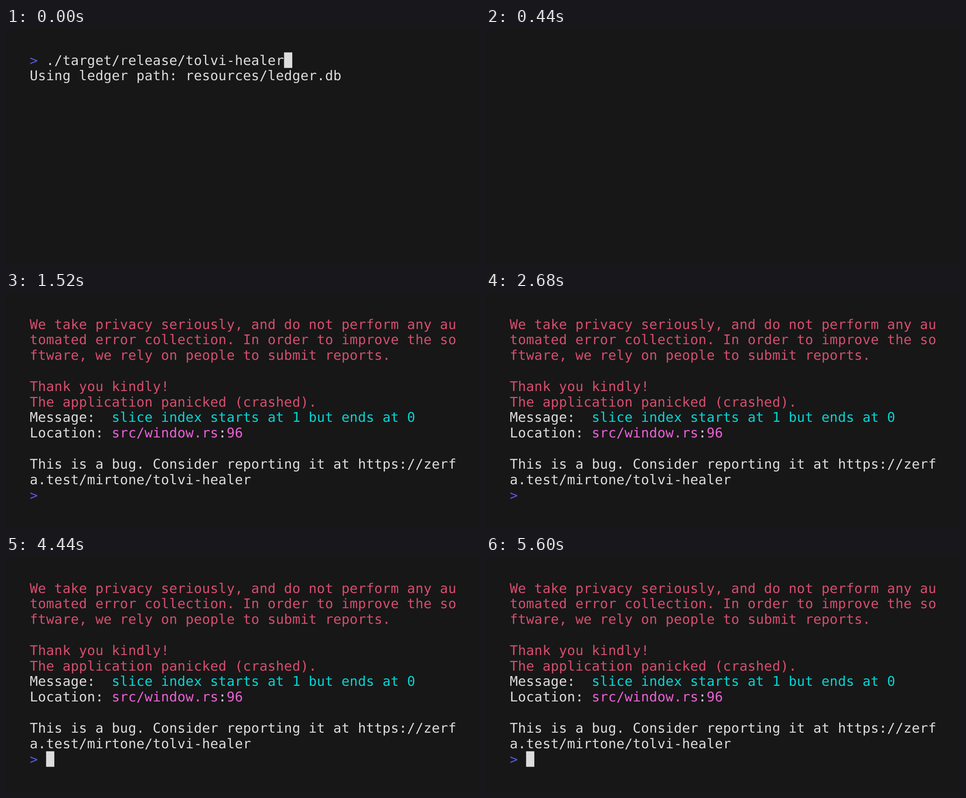
These frames come from a looping animation (1058 by 529 pixels, 5840 ms). An HTML page:

```html
<!DOCTYPE html>
<html lang="en">
<head>
<meta charset="utf-8">
<title>Terminal session</title>
<style>
  html, body { margin: 0; width: 100%; height: 100%; overflow: hidden; background: #171717; }
  svg { display: block; width: 1058px; height: 529px; }
  text {
    font: 30px "DejaVu Sans Mono", monospace;
    letter-spacing: .252px;
    white-space: pre;
    text-rendering: geometricPrecision;
  }
  .bold { font-weight: bold; }
  path { fill: none; stroke-width: 1; }
</style>
</head>
<body>
<svg id="stage" viewBox="0 0 1058 529"></svg>
<script>
const LOOP = 5840;
const LEFT = 52.9, TOP = 54.7, CELL = 18.314, ROW = 34.82, BASELINE = 27.8;
const FG = '#dddddd', DIM = '#7a7a7a', PROMPT = '#5b56e0', BLUE = '#8056ff',
      RED = '#d74e6f', CYAN = '#04d7d7', PINK = '#ed61d7';

const colX = col => LEFT + col * CELL;
const rowY = row => TOP + row * ROW;

function add(parent, tag, attrs) {
  const el = document.createElementNS('http://www.w3.org/2000/svg', tag);
  for (const key in attrs) el.setAttribute(key, attrs[key]);
  return parent.appendChild(el);
}

function write(parent, col, row, string, fill = FG, cls = '') {
  const attrs = { x: colX(col), y: rowY(row) + BASELINE, fill, class: cls };
  add(parent, 'text', attrs).textContent = string;
}

function cursor(parent, col, row) {
  return add(parent, 'rect', { x: colX(col), y: rowY(row), width: CELL, height: ROW, fill: FG });
}

// Frame whose top edge is interrupted by its title.
function panel(parent, fromCol, toCol, top, bottom, row, title, stroke = FG) {
  const snap = x => Math.floor(x) + .5;
  const left = snap(colX(fromCol + .5)), right = snap(colX(toCol + .5));
  const start = colX(fromCol + 1), end = colX(fromCol + 1 + title.length);
  add(parent, 'path', { d: `M${start} ${top}H${left}V${bottom}H${right}V${top}H${end}`, stroke });
  write(parent, fromCol + 1, row, title);
}

// Hard on/off switching; each step is [time in ms, visible].
function blink(el, steps) {
  const frames = steps.map(([time, on]) => ({ offset: time / LOOP, opacity: on, easing: 'step-end' }));
  frames.push({ offset: 1, opacity: steps[steps.length - 1][1] });
  el.animate(frames, { duration: LOOP, iterations: Infinity });
}

const stage = document.getElementById('stage');
const [launch, browser, crash] = [0, 1, 2].map(() => add(stage, 'g', {}));

write(launch, 0, 0, '>', PROMPT);
write(launch, 2, 0, './target/release/tolvi-healer');
write(launch, 0, 1, 'Using ledger path: resources/ledger.db');
cursor(launch, 31, 0);

write(browser, 0, 0, 'Reading tolvi ledger at "resources/ledger.db"', DIM);
panel(browser, 0, 9, 107.5, 177.5, 1, 'Nav Mode', BLUE);
panel(browser, 10, 51, 107.5, 177.5, 1, 'Note');
panel(browser, 0, 9, 211.5, 420.5, 4, 'Entity T');
panel(browser, 10, 51, 211.5, 420.5, 4, 'Account Details');
write(browser, 2, 2, 'Browse', FG, 'bold');
write(browser, 11, 2, 'Search may take time while an index buil', DIM);
write(browser, 1, 5, '>> accou', FG, 'bold');
['block', 'dreps', 'pools', 'propo'].forEach((name, i) => write(browser, 4, 6 + i, name));
write(browser, 11, 5, 'None selected');
write(browser, 0, 11, 'Use Shift + Arrow keys to move focus. Use Arrow keys', DIM);

[
  'We take privacy seriously, and do not perform any au',
  'tomated error collection. In order to improve the so',
  'ftware, we rely on people to submit reports.',
  '',
  'Thank you kindly!',
  'The application panicked (crashed).'
].forEach((line, row) => write(crash, 0, row, line, RED));
write(crash, 0, 6, 'Message:');
write(crash, 10, 6, 'slice index starts at 1 but ends at 0', CYAN);
write(crash, 0, 7, 'Location:');
write(crash, 10, 7, 'src/window.rs', PINK);
write(crash, 23, 7, ':');
write(crash, 24, 7, '96', PINK);
write(crash, 0, 9, 'This is a bug. Consider reporting it at https://zerf');
write(crash, 0, 10, 'a.test/mirtone/tolvi-healer');
write(crash, 0, 11, '>', PROMPT);
const caret = cursor(crash, 2, 11);

blink(launch, [[0, 1], [40, 0]]);
blink(browser, [[0, 0], [40, 1], [440, 0]]);
blink(crash, [[0, 0], [480, 1]]);
blink(caret, [[0, 1], [1520, 0], [2080, 1], [2680, 0], [3280, 1], [3840, 0], [4440, 1], [5040, 0], [5600, 1]]);
</script>
</body>
</html>
```
